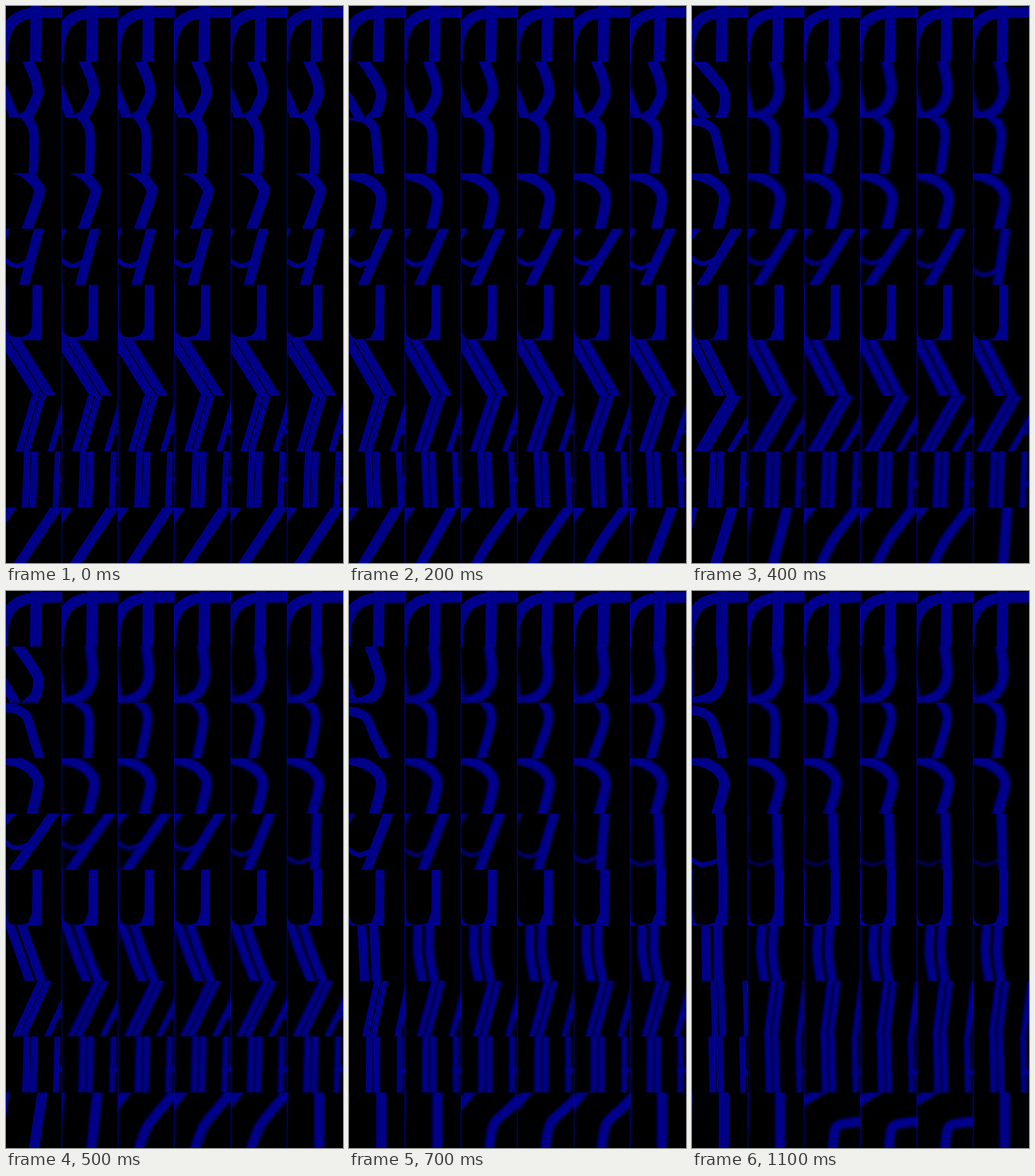
Recreate the animation shown at these times as an HTML page with a canvas. Size 582 px wide and 963 px high, loop 1200 ms.

```html
<!DOCTYPE html>
<html>
<head>
<meta charset="utf-8">
<style>
html, body { margin: 0; width: 582px; height: 963px; overflow: hidden; background: #000; }
canvas { display: block; }
</style>
</head>
<body>
<canvas id="stage" width="582" height="963"></canvas>
<script>
const ctx = document.getElementById('stage').getContext('2d');
const CELL_W = 97, CELL_H = 96.3, COLS = 6, STEPS = 12, STEP_MS = 100;

const lerp = (a, b, u) => a + (b - a) * u;
const clamp = (v, lo, hi) => Math.max(lo, Math.min(hi, v));

// Values between key poses given as [step, ...values].
function blend(keys, step) {
  const i = clamp(keys.findIndex(k => k[0] > step), 0, keys.length) || keys.length;
  const from = keys[i - 1], to = keys[i] || from;
  const u = to === from ? 0 : (step - from[0]) / (to[0] - from[0]);
  return from.slice(1).map((v, k) => lerp(v, to[k + 1], u));
}

// A stroke is [width, x, y, x, y, ...] in cell coordinates.
const bar = (width, top, bottom) => [width, top, 0, bottom, 97];

// A filled corner at the top left, cut by the line (x,0)-(0,y).
function corner(x, y) {
  const k = 8 / Math.hypot(x, y), dx = -y * k, dy = -x * k;
  return [16, x + dx, dy, dx, y + dy];
}

// Two parallel bars, a third to the right and a crossbar on it.
function rails(width, top, bottom, gap, barY, barW) {
  const x = lerp(top, bottom, barY / 97) + gap;
  return [
    bar(width, top, bottom),
    bar(width, top + 13, bottom + 13),
    bar(10, top + gap, bottom + gap),
    [barW, x, barY, 110, barY]
  ];
}

const bend = [38, 51, 55, 46, 30, -25, 15];

// Each rule gives the strokes of a cell; column 0 is sharp, the others follow it loosely.
const rules = [
  function roof() {
    return [
      [18.5, -6, 97, -5, 62, 1, 43, 10, 28, 26, 17, 48, 12, 97, 10.5],
      bar(19, 52, 50.5)
    ];
  },

  function hookedStem(step, col) {
    const keys = col
      ? [[0, ...bend], [1.5, ...bend], [5, 48, 52, 52, 42, 0, -14, -1]]
      : [[0, ...bend], [4, 13, 39, 56, 56, 49, -50, 22], [9, 52, 52, 52, 43, 0, -7, -6]];
    const [a, b, c, d, e, l, m] = blend(keys, step);
    return [
      [18, a, 0, b, 30, c, 55, d, 78, lerp(e, d, 0.6), 90, e, 97],
      bar(16, l, m)
    ];
  },

  function arch(step, col) {
    if (col) {
      // The shoulder moves right while the foot swings left and back.
      const depth = 16 * Math.sin((col - 1) * Math.PI / 4.8);
      const swing = Math.exp(-(((step - 5 - depth / 4) / 4) ** 2));
      const s = depth * swing * 0.6;
      return [[16, 16 + 3 * s, -9, 32 + 1.8 * s, 2, 43 + 1.2 * s, 14, 47 + 0.7 * s, 37, 44 - s / 0.6, 97]];
    }
    const [drop, foot] = blend([[0, -12, 47], [4, 5, 56], [9, 21, 68], [11, 13, 53]], step);
    return [[
      16, -2, drop, 20 - 0.35 * drop, drop + 3, Math.min(42, 40 - 0.6 * drop), 18 + 0.7 * drop,
      46 - 0.2 * drop, 44 + 0.9 * drop, foot, 97
    ]];
  },

  function bow(step) {
    return [[18, ...blend([
      [0, 14, -9, 32, -1, 45, 10, 54, 22, 57, 36, 36, 97],
      [2, -4, 1, 14, 5, 30, 11, 47, 24, 55.5, 46, 45, 97],
      [11, -4, 1, 14, 5, 30, 11, 47, 24, 55.5, 46, 42, 97]
    ], step)]];
  },

  function leaningY(step, col) {
    // Columns further right run ahead.
    const lead = col ? 0.07 * (col - 1) ** 3 * Math.min(1, step / 2) : 0;
    const [top, bottom, y] = blend(
      [[0, 57, 31, 53], [5, 82, 14, 48], [9, 53, 47, 72], [11, 49, 52, 77]], step + lead);
    const lean = top - bottom, end = lerp(top, bottom, (y + 2) / 97) - 4;
    return [
      bar(16.5, top, bottom),
      [col ? 9 - step * 0.5 : 8, -4, y - 1, 8, y + 8, 21, y + 11, end, y + 3],
      corner(Math.max(0, lean * 0.26), 20)
    ];
  },

  function cup(step) {
    const y = Math.min(102, 97 + step * 2);
    return [
      [14, -6, 0, -6, 75, -1, y - 8, 8, y - 1, 20, y, 32, y - 1, 43, y - 6, 52, 75],
      bar(15.5, 53.5, 52.7)
    ];
  },

  function pair(step, col) {
    const [top, bottom] = blend([[0, -4, 57], [4, -1, 48], [7, 22, 27], [11, 24, 25]], step);
    const sag = col ? clamp(step - 4, 0, 3) : 0;
    return [0, 20.5].map(dx =>
      [15.5, top + dx, 0, (top + bottom) / 2 + dx - sag, 48, bottom + dx + sag, 97]);
  },

  function leaningRails(step, col) {
    const at = col ? Math.min(step * 0.88 + 0.4, 7.7) : step;
    const [top, bottom] = blend([[0, 50, 22], [2, 50, 21], [4, 66, 10], [9, 37, 40]], at);
    return rails(10.7, top, bottom, 55, 62, 6);
  },

  function swayingRails(step) {
    const [sway, y] = blend([[0, 2, 48], [2, -2, 49], [4, 2, 56], [9, -1, 62]], step);
    return rails(11.5, 35 + sway, 35 - sway, 52.5, y, 8);
  },

  function slash(step, col) {
    if (col > 1 && col < 5) {
      const [cx, cy, ...pts] = blend([
        [0, 18, 27, 87, 0, 65, 33, 44, 65, 23, 97],
        [4, 21, 28, 91, 0, 69, 29, 46, 62, 29, 97],
        [7, 26, 32, 104, 6, 80, 30, 56, 55, 48, 97],
        [11, 38, 24, 104, 50, 72, 53, 54, 62, 49, 97]
      ], step);
      return [[17, ...pts], corner(cx, cy)];
    }
    const [top, bottom, cx, cy] = blend(
      [[0, 87, 23, 18, 27], [2, 83, 25, 18, 27], [6, 56, 56, 2, 50], [11, 55, 55, 1, 60]],
      step + col * 0.3);
    return [bar(17.5, top, bottom), corner(cx, cy)];
  }
];
const crisp = ['roof', 'cup'];

// Smooth curve through the points.
function trace(pts) {
  const n = pts.length / 2;
  const at = i => {
    const k = 2 * clamp(i, 0, n - 1);
    return [pts[k], pts[k + 1]];
  };
  ctx.beginPath();
  ctx.moveTo(pts[0], pts[1]);
  for (let i = 0; i < n - 1; i++) {
    const [p, a, b, q] = [at(i - 1), at(i), at(i + 1), at(i + 2)];
    ctx.bezierCurveTo(
      a[0] + (b[0] - p[0]) / 6, a[1] + (b[1] - p[1]) / 6,
      b[0] - (q[0] - a[0]) / 6, b[1] - (q[1] - a[1]) / 6,
      b[0], b[1]
    );
  }
}

function drawCell(rule, row, col, step) {
  const y = Math.round(row * CELL_H), bottom = Math.round((row + 1) * CELL_H);
  const follower = step ? col : 0; // all columns start alike
  const blur = follower ? Math.min(2, step * 0.5) * (crisp.includes(rule.name) ? 0.35 : 1) : 0;
  const layers = blur ? [[1, '#00008c']] : [[1, '#000090'], [0.6, '#000084'], [0.2, '#00008e']];
  const strokes = rule(step, follower);
  ctx.save();
  ctx.beginPath();
  ctx.rect(col * CELL_W, y, CELL_W, bottom - y);
  ctx.clip();
  ctx.translate(col * CELL_W, y);
  ctx.lineCap = 'square';
  ctx.lineJoin = 'round';
  if (blur) ctx.filter = `blur(${blur}px)`;
  for (const [scale, color] of layers) {
    ctx.strokeStyle = color;
    for (const [width, ...pts] of strokes) {
      trace(pts);
      ctx.lineWidth = width * scale;
      ctx.stroke();
    }
  }
  ctx.restore();
}

function drawStage(step) {
  ctx.fillStyle = '#000';
  ctx.fillRect(0, 0, 582, 963);
  rules.forEach((rule, row) => {
    for (let col = 0; col < COLS; col++) drawCell(rule, row, col, step);
  });
  ctx.fillStyle = '#0000c0';
  for (let i = 1; i < COLS; i++) ctx.fillRect(Math.floor(97.2 * i - 0.8), 0, 1, 963);
}

let shown = -1;
function tick() {
  const step = Math.floor(performance.now() / STEP_MS) % STEPS;
  if (step !== shown) drawStage(shown = step);
  requestAnimationFrame(tick);
}
tick();
</script>
</body>
</html>
```
